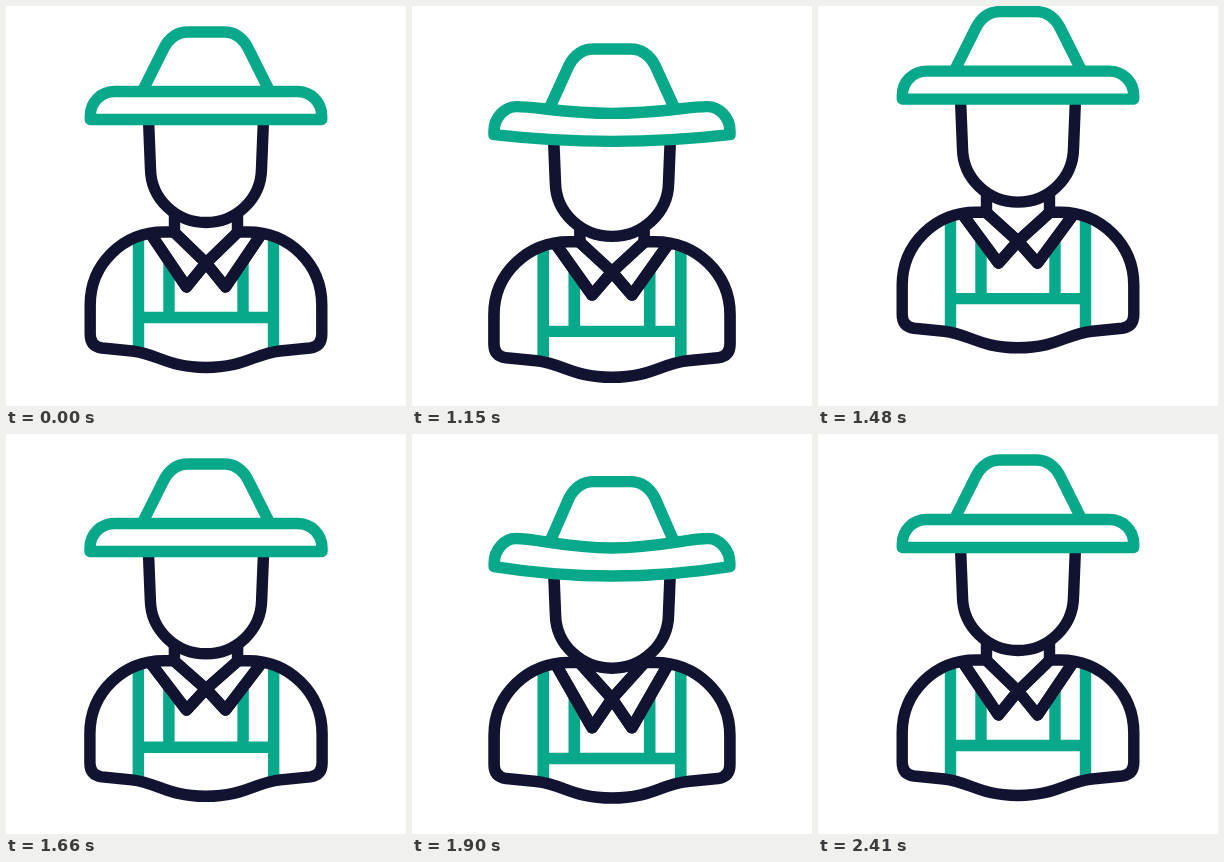
Write an HTML page that moves like this. It is 400 px wide and 400 px high and loops after 2440 ms.

```html
<!DOCTYPE html>
<html lang="en">
<head>
<meta charset="utf-8">
<title>Farmer</title>
<style>
  html, body { margin: 0; width: 100%; height: 100%; overflow: hidden; background: #fff; }
  svg { display: block; width: 100vw; height: 100vh; }
  path { fill: none; stroke: #121331; stroke-width: 11.4; stroke-linejoin: round; }
  .green { stroke: #08a88a; }
  .solid { fill: #fff; }
</style>
</head>
<body>
<svg viewBox="0 0 400 400">
  <g id="figure">
    <path id="straps" class="green"/>
    <path id="collarR" class="solid"/>
    <path id="collarL" class="solid"/>
    <path id="collarLines"/>
    <path id="body"/>
    <path id="neck"/>
    <path id="head" class="solid"/>
    <path id="brim" class="green solid"/>
    <path id="crown" class="green"/>
  </g>
</svg>
<script>
const LOOP = 2440, HOLD = 1030, STEP = 30, START = 1000, END = 2410;

const el = id => document.getElementById(id);
const set = (id, d) => el(id).setAttribute("d", d);
const wave = (t, from, half) => Math.sin(Math.PI * (t - from) / half);

// Crouch, leap between two times, then a landing swing that dies away
function bounce(t, { crouch, up, leap, down, land, half }) {
  if (t <= START || t >= END) return 0;
  if (t < up) return crouch * wave(t, START, up - START);
  if (t < down) return -leap * wave(t, up, down - up);
  return land * (1 - (t - down) / (END - down)) ** 2 * wave(t, down, half);
}

// Each part follows the same bounce with its own weight and delay
const BODY = { crouch: 10, up: 1265, leap: 20, down: 1655, land: 14.5, half: 280 };
const HAT = { crouch: 17, up: 1290, leap: 20.5, down: 1650, land: 52, half: 400 };
const TIP = { crouch: 9, up: 1235, leap: 24, down: 1690, land: 27, half: 350 };
const BIB = { crouch: 14, up: 1275, leap: 19, down: 1653, land: 32, half: 380 };

function draw(t) {
  const body = bounce(t, BODY), hat = bounce(t, HAT);
  const tip = bounce(t, TIP), bib = bounce(t, BIB);
  const head = hat > 0 ? hat * 0.82 : hat;
  const bend = 0.36 * Math.max(0, bounce(t - 15, HAT));
  const sx = 1 + 0.0014 * Math.max(0, bib);
  el("figure").setAttribute("transform", `translate(${200 - 200 * sx} 0) scale(${sx} 1)`);

  const h = y => y + hat;
  const end = y => y + hat - bend * 0.3;
  const mid = y => y + hat + bend * 0.8;
  const f = y => y + head;
  const b = y => y + body;
  const bar = 311.5 + bib;
  const crest = 109 - bend * 0.4;

  set("crown", `M137 ${mid(84)}L157.5 ${h(43)}C163 ${h(32)} 171 ${h(26)} 182 ${h(26)}
    H218C229 ${h(26)} 237 ${h(32)} 242.5 ${h(43)}L263 ${mid(84)}`);

  set("brim", `M84.3 ${end(113.5)}V${end(110)}
    C84.3 ${end(96)} 95 ${end(85.5)} ${crest} ${end(85.5)}
    C126 ${end(85.5)} 155 ${mid(85.5)} 200 ${mid(85.5)}
    S274 ${end(85.5)} ${400 - crest} ${end(85.5)}
    C305 ${end(85.5)} 315.7 ${end(96)} 315.7 ${end(110)}V${end(113.5)}
    Q258 ${mid(113.5)} 200 ${mid(113.5)}T84.3 ${end(113.5)}Z`);

  set("head", `M142.5 ${f(113)}L144.5 ${f(163)}C145 ${f(193)} 170 ${f(216.5)} 200 ${f(216.5)}
    S255 ${f(193)} 255.5 ${f(163)}L257.5 ${f(113)}`);

  set("neck", `M168.5 ${f(205)}V${b(228)}M231.5 ${f(205)}V${b(228)}`);

  set("body", `M173 ${b(226)}H158C117 ${b(226)} 84.2 ${b(258)} 84.2 ${b(299)}V${b(328)}
    Q84.2 ${b(340.5)} 96 ${b(342)}L126 ${b(345)}
    C152 ${b(348)} 162 ${b(361.5)} 200 ${b(361.5)}
    S248 ${b(348)} 274 ${b(345)}L304 ${b(342)}
    Q315.8 ${b(340.5)} 315.8 ${b(328)}V${b(299)}
    C315.8 ${b(258)} 283 ${b(226)} 242 ${b(226)}H227`);

  set("straps", `M132.5 ${b(232)}V${b(345)}M267.5 ${b(232)}V${b(345)}
    M163 ${b(245)}V${bar}M237 ${b(245)}V${bar}M132.5 ${bar}H267.5`);

  const cross = 257 + (body + tip) / 2;
  const flap = x => `M${x(146)} ${b(230)}L${x(180.5)} ${281 + tip}L${x(200)} ${cross}L`;
  const left = x => x, right = x => 400 - x;
  set("collarL", flap(left) + `168 ${b(226)}`);
  set("collarR", flap(right) + `232 ${b(226)}`);
  set("collarLines", flap(left) + `233 ${b(225)}` + flap(right) + `167 ${b(225)}`);
}

const t0 = performance.now();
function tick(now) {
  const t = Math.max(0, now - t0) % LOOP;
  draw(t < HOLD ? 0 : HOLD + Math.floor((t - HOLD) / STEP) * STEP);
  requestAnimationFrame(tick);
}
draw(0);
requestAnimationFrame(tick);
</script>
</body>
</html>
```
